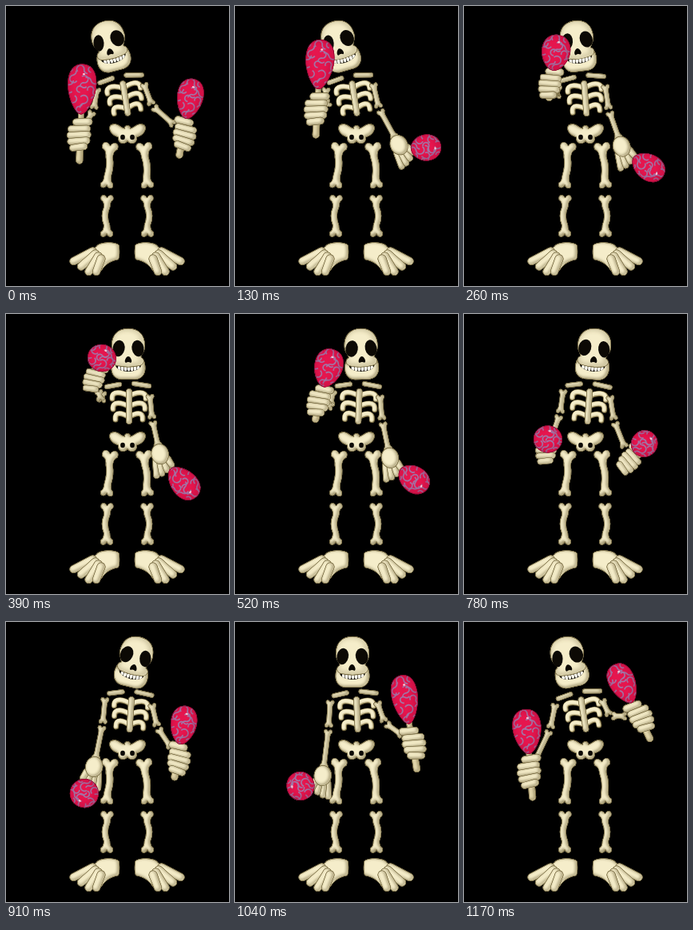
Write an HTML page with a canvas that moves like this. It is 279 px wide and 350 px high and loops after 1.3 s.

```html
<!DOCTYPE html>
<html lang="en">
<head>
<meta charset="utf-8">
<title>Skeleton with maracas</title>
<style>
html, body { margin: 0; width: 100%; height: 100%; overflow: hidden; background: #000; }
canvas { display: block; width: 279px; height: 350px; }
</style>
</head>
<body>
<canvas id="stage" width="279" height="350"></canvas>
<script>
const ctx = document.getElementById('stage').getContext('2d');
const BONE = '#f5edca', SHADE = '#75683f', HOLE = '#0c0904';
const STEP = 130, STEPS = 10;

// Key points of the dance; everything else follows from them.
const beats = [0, 1, 3, 5, 7, 8, 9];
const head = { x: [129, 130, 153, 160, 162, 147, 130], tilt: [-15, -16, 0, -4, 14, 0, -13] };
const left = {
  side: 1,
  hand: { x: [93, 103, 112, 101, 109, 109, 83], y: [160, 128, 80, 147, 187, 198, 186] },
  ball: { x: [95, 106, 120, 110, 98, 82, 79], y: [104, 73, 55, 97, 214, 205, 137] }
};
const right = {
  side: -1,
  hand: { x: [222, 208, 194, 200, 215, 222, 219], y: [159, 179, 181, 188, 170, 151, 118] },
  ball: { x: [230, 239, 222, 227, 222, 213, 199], y: [116, 177, 211, 190, 129, 97, 77] }
};

// Smooth closed curve through the key values.
function curve(values, step) {
  const n = beats.length;
  const time = i => beats[(i + n) % n] + STEPS * Math.floor(i / n);
  const value = i => values[(i + n) % n];
  const slope = i => (value(i + 1) - value(i - 1)) / (time(i + 1) - time(i - 1));
  let i = n - 1;
  while (beats[i] > step) i--;
  const span = time(i + 1) - time(i), u = (step - time(i)) / span;
  const ease = u * u * (3 - 2 * u);
  return value(i) + (value(i + 1) - value(i)) * ease
    + span * u * (1 - u) * (slope(i) * (1 - u) - slope(i + 1) * u);
}

const point = (path, step) => ({ x: curve(path.x, step), y: curve(path.y, step) });
const rad = deg => deg * Math.PI / 180;
const clamp = v => Math.max(0, Math.min(1, v));

function toward(a, b, dist) {
  const len = Math.hypot(b.x - a.x, b.y - a.y) || 1;
  return { x: a.x + (b.x - a.x) / len * dist, y: a.y + (b.y - a.y) / len * dist };
}

function at(p, angle, sx, sy, draw) {
  ctx.save();
  ctx.translate(p.x, p.y);
  ctx.rotate(angle);
  ctx.scale(sx, sy);
  draw();
  ctx.restore();
}

function fill(path, color) {
  ctx.fillStyle = color;
  ctx.fill(path);
}

function ellipse(x, y, rx, ry, turn = 0) {
  const p = new Path2D();
  p.ellipse(x, y, rx, ry, turn, 0, 7);
  return p;
}

// Rounds a shape by darkening its inner edge, mostly lower right.
function innerShade(path, color, blur) {
  ctx.save();
  ctx.clip(path);
  ctx.strokeStyle = ctx.shadowColor = color;
  ctx.lineWidth = 1;
  ctx.shadowBlur = blur;
  ctx.shadowOffsetX = -1.6;
  ctx.shadowOffsetY = -1;
  ctx.stroke(path);
  ctx.stroke(path);
  ctx.restore();
}

function solid(path, color = BONE, blur = 3.5) {
  fill(path, color);
  innerShade(path, SHADE, blur);
}

function capsule(x1, y1, x2, y2, r1, r2 = r1) {
  const a = Math.atan2(y2 - y1, x2 - x1), q = Math.PI / 2;
  const p = new Path2D();
  p.arc(x1, y1, r1, a + q, a - q);
  p.arc(x2, y2, r2, a - q, a + q);
  p.closePath();
  return p;
}

// Shaft of half-width `half` between two double knobs k1 and k2, bent by `bow`.
function bone(a, b, half, k1, k2 = k1, bow = 0) {
  const len = Math.hypot(b.x - a.x, b.y - a.y);
  const neck1 = Math.min(1.6 * k1, len / 2), neck2 = len - Math.min(1.6 * k2, len / 2);
  const p = new Path2D();
  p.moveTo(0, .1 * k1);
  p.bezierCurveTo(k1 * .3, -k1 * .6, k1 * 1.3, -k1 * .5, k1, k1 * .5);
  p.quadraticCurveTo(half, k1 * .7, half, neck1);
  p.quadraticCurveTo(half + bow, len / 2, half, neck2);
  p.quadraticCurveTo(half, len - k2 * .7, k2, len - k2 * .5);
  p.bezierCurveTo(k2 * 1.3, len + k2 * .5, k2 * .3, len + k2 * .6, 0, len - k2 * .1);
  p.bezierCurveTo(-k2 * .3, len + k2 * .6, -k2 * 1.3, len + k2 * .5, -k2, len - k2 * .5);
  p.quadraticCurveTo(-half, len - k2 * .7, -half, neck2);
  p.quadraticCurveTo(bow - half, len / 2, -half, neck1);
  p.quadraticCurveTo(-half, k1 * .7, -k1, k1 * .5);
  p.bezierCurveTo(-k1 * 1.3, -k1 * .5, -k1 * .3, -k1 * .6, 0, .1 * k1);
  at(a, Math.atan2(b.y - a.y, b.x - a.x) - Math.PI / 2, 1, 1, () => solid(p));
}

function tube(d, w) {
  const path = new Path2D(d);
  ctx.lineCap = 'round';
  for (const [color, size, shift] of [['#75683f', 1, 0], ['#d8cda4', .78, -.3], ['#f5edca', .52, -.7]]) {
    ctx.save();
    ctx.translate(shift, shift);
    ctx.strokeStyle = color;
    ctx.lineWidth = w * size;
    ctx.stroke(path);
    ctx.restore();
  }
}

function leg(side) {
  at({ x: 151.5, y: 0 }, 0, side, 1, () => {
    bone({ x: -21, y: 174 }, { x: -25.5, y: 225 }, 4.5, 9.5, 7.5, 3 * side);
    bone({ x: -25, y: 239 }, { x: -25.5, y: 286 }, 4, 7.5, 7.5, -5);
    solid(new Path2D('M-39 301C-36 294 -13 294 -10 299C-9 305 -9 314 -11 317C-20 319 -27 322 -32 331L-48 329L-60 315Z'));
    for (let i = 0; i < 4; i++)
      solid(capsule(-43 + i * 3.5, 307 + i * 3, -67 + i * 9.5, 319 + Math.min(i, 2) * 6.5, 5.5, 5));
  });
}

function pelvis() {
  at({ x: 152, y: 160 }, 0, 1.2, 1, () => {
    solid(new Path2D('M-18 -11C-12 -16 -7 -8 -3 -7C-4 -12 4 -12 3 -7C7 -8 12 -16 18 -11C21 -5 16 2 10 4C10 14 2 13 0 9C-2 13 -10 14 -10 4C-16 2 -21 -5 -18 -11Z'));
    for (const s of [-1, 1]) fill(ellipse(s * 5, 4, 2.4, 3.2), HOLE);
  });
}

function ribcage() {
  solid(capsule(-28, -24, -12, -27, 3));
  solid(capsule(6, -28, 25, -25, 3));
  for (let row = 0; row < 3; row++) {
    const y = -14 + 13 * row, w = 22 - row * row;
    for (const s of [-1, 1])
      tube(`M0 ${y + 2}C${s * 8} ${y - 3} ${s * w} ${y - 6} ${s * (w - 1)} ${y + 5}`, 7);
  }
  solid(capsule(0, -18, 0, 19, 3.8));
}

function skull(turn) {
  solid(new Path2D('M-20 15C-24 28 -19 37 -9 38L9 38C19 37 24 28 20 15C14 24 -14 24 -20 15Z'));
  const mouth = new Path2D('M-16 19Q0 24 16 19Q16 27 0 28Q-16 27 -16 19Z');
  fill(mouth, HOLE);
  ctx.save();
  ctx.clip(mouth);
  for (let x = -13; x < 13; x += 4) fill(ellipse(x + 1.6, 24, 1.8, 3.6), '#fffdf0');
  ctx.restore();
  solid(new Path2D('M-21 -4C-21 -19 -12 -26 0 -26C12 -26 21 -19 21 -4C21 3 17 6 16 10C22 13 20 20 13 21Q0 24 -13 21C-20 20 -22 13 -16 10C-17 6 -21 3 -21 -4Z'), BONE, 6);
  for (const s of [-1, 1])
    fill(ellipse(s * 12 + turn, -1, 7.5 - s * turn * .8, 10.3, s * -.2), HOLE);
  at({ x: turn * 2, y: 9 }, 0, 1, 1, () =>
    fill(new Path2D('M0 0C3 0 6 7 3 8Q0 6 -3 8C-6 7 -3 0 0 0Z'), HOLE));
}

function fist() {
  solid(ellipse(0, 0, 12, 18), '#8d8057');
  solid(capsule(-6, -15, 10, -16, 4.5, 5));
  for (let i = 0; i < 4; i++) {
    const inset = (i - 1) ** 2;
    solid(capsule(-13 + inset, -6 + i * 8, 9 - inset, -7 + i * 7.5, 4.4, 4.8));
  }
}

function hangingHand() {
  for (let i = 0; i < 4; i++)
    solid(capsule(-7 + i * 5, 2, -10 + i * 7, 19 - i * i, 4.5, 4));
  solid(ellipse(0, -6, 11, 13));
}

function swirls(rx, ry) {
  let seed = 23;
  const rnd = () => (seed = seed * 16807 % 2147483647) / 2147483647;
  ctx.lineWidth = 1.7;
  ctx.strokeStyle = '#a275a6';
  for (let row = 0; row < 5; row++) {
    for (let col = 0; col < 3; col++) {
      const x = (col - 1 + (row % 2 - .5) * .4) * rx * .75;
      const y = (row - 2) * ry * .4;
      const start = rnd() * 6.28, r = 3.5 + rnd() * 2;
      ctx.beginPath();
      ctx.arc(x, y, r, start, start + 4);
      ctx.arc(x + r * 2 * Math.cos(start + 4), y + r * 2 * Math.sin(start + 4), r, start + 7.1, start + 5.5, true);
      ctx.stroke();
    }
  }
}

function shaker(rx, ry, taper) {
  const wide = -.22 * ry * taper, low = rx * (.56 - .15 * taper);
  const p = new Path2D();
  p.moveTo(0, -ry);
  for (const s of [1, -1]) {
    const [top, end] = s > 0 ? [-ry, ry] : [ry, -ry];
    const inner = s > 0 ? rx * .56 : -low, outer = s > 0 ? low : -rx * .56;
    p.bezierCurveTo(inner, top, s * rx, wide - s * ry * .55, s * rx, wide);
    p.bezierCurveTo(s * rx, wide + s * ry * .55, outer, end, 0, end);
  }
  fill(p, '#e5164e');
  ctx.save();
  ctx.clip(p);
  swirls(rx, ry);
  ctx.restore();
  innerShade(p, '#8a0a34', 7);
  fill(ellipse(rx * .1, -ry * .6, 1.6, 1.2), '#ffc3d2');
}

function armWithMaraca({ side, hand, ball }, step, shoulder) {
  const h = point(hand, step), b = point(ball, step);
  const elbow = {
    x: shoulder.x + (h.x - shoulder.x) * .2,
    y: shoulder.y + 16 + (h.y - shoulder.y) * .17
  };
  bone(shoulder, toward(elbow, shoulder, 2), 3.2, 5);
  bone(toward(elbow, h, 4), toward(h, elbow, 17), 3.2, 5);

  // The farther the ball is from the hand, the more it is seen side-on.
  const reach = Math.hypot(b.x - h.x, b.y - h.y);
  const ry = 17 + Math.max(0, reach - 27) * .5;
  const taper = clamp((ry - 17) / 10);
  const axis = Math.atan2(h.y - b.y, h.x - b.x) - Math.PI / 2;
  const raised = b.y < h.y - 10, size = .86 + .12 * taper;

  at(b, axis, 1, 1, () => solid(capsule(0, ry * .8, 0, reach + 33 * taper * raised, 3.5, 4.5), '#e6dab0'));
  if (raised) at(h, axis, size * side, size, fist);
  else at(h, Math.atan2(h.y - elbow.y, h.x - elbow.x) - Math.PI / 2, -side, 1, hangingHand);
  at(b, axis, 1, 1, () => shaker(side > 0 ? 18 : 16.5, ry, taper));
}

function draw(step) {
  const x = curve(head.x, step), tilt = curve(head.tilt, step);
  const lean = (x - 153) * .4, sin = Math.sin(rad(lean)), cos = Math.cos(rad(lean));
  const chest = { x: 154 + lean / 2, y: 115 };
  const onChest = (dx, dy) => ({ x: chest.x + dx * cos - dy * sin, y: chest.y + dx * sin + dy * cos });

  ctx.fillStyle = '#000';
  ctx.fillRect(0, 0, 279, 350);
  leg(1);
  leg(-1);
  pelvis();
  at(chest, rad(lean), 1, 1, ribcage);
  at({ x, y: 44 }, rad(tilt), 1, 1, () => skull((x - 153) / 20));
  armWithMaraca(left, step, onChest(-33, -17));
  armWithMaraca(right, step, onChest(26, -13));
}

let shown = -1;
const begin = performance.now();
function tick() {
  const step = Math.floor((performance.now() - begin) / STEP) % STEPS;
  if (step !== shown) draw(shown = step);
  requestAnimationFrame(tick);
}
tick();
</script>
</body>
</html>
```
